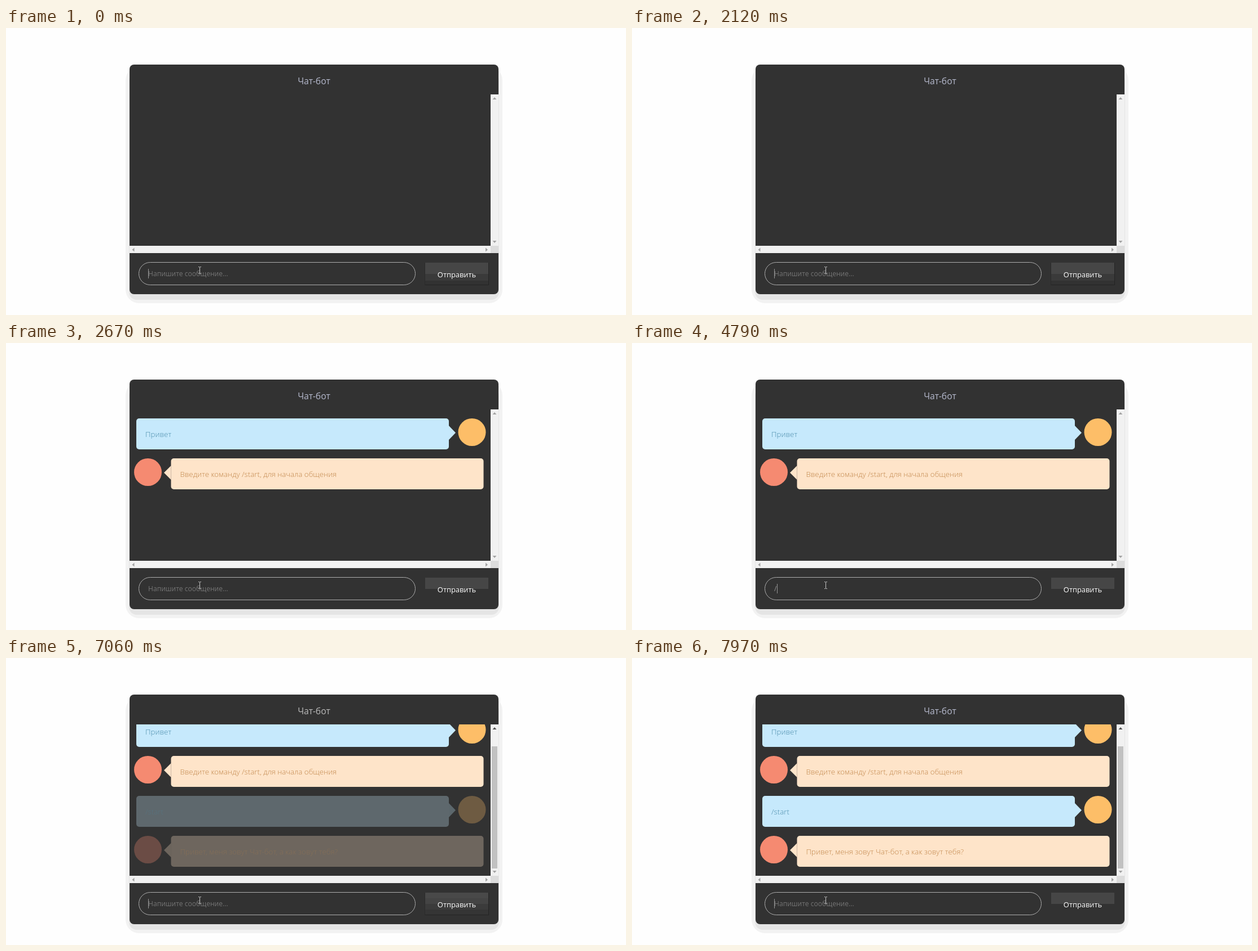
Animation of 1099 by 510 pixels, one loop 8000 ms. Source, as an HTML page with a canvas:

```html
<!DOCTYPE html>
<html lang="ru">
<head>
<meta charset="utf-8">
<title>Чат-бот</title>
<style>
html, body { margin: 0; width: 100%; height: 100%; overflow: hidden; background: #fefefe; }
canvas { display: block; }
</style>
</head>
<body>
<canvas id="stage" width="1099" height="510"></canvas>
<script>
const ctx = document.getElementById('stage').getContext('2d');
const LOOP = 8000;
const FONT = '"Open Sans", "Noto Sans", sans-serif';
const PANEL = '#323232';
const SCROLL_AT = 6910, SCROLL_BY = 31, ROW = 71;

// Moments at which each further character appears
const drafts = [
  { text: 'Привет', keys: [910, 1170, 1300, 1580, 1710, 1840], sent: 2120 },
  { text: '/start', keys: [3750, 5690, 5960, 6240, 6530, 6660], sent: 6910 }
];
const caretOff = [[400, 910], [2670, 3220], [4290, 4790], [5300, 5690], [7460, 7970]];
const fades = [[2250, 2400, 2530, 2670], [7060, 7190, 7320, 7460]];
const levels = [0, 0.29, 0.56, 0.82, 1];

const messages = [
  { text: 'Привет', user: true },
  { text: 'Введите команду /start, для начала общения', user: false },
  { text: '/start', user: true },
  { text: 'Привет, меня зовут Чат-бот, а как зовут тебя?', user: false }
];
const themes = {
  user: { x: 231, fill: '#c6e9fc', ink: '#4a8cab', side: 785, tip: 797, faceX: 826, face: '#fdbe68' },
  bot: { x: 292.5, fill: '#fee4c9', ink: '#c08549', side: 292.5, tip: 280, faceX: 251.5, face: '#f58a71' }
};

const countPassed = (times, t) => times.filter(at => t >= at).length;
const within = (t, [from, to]) => t >= from && t < to;

function rect(x, y, w, h, fill) {
  ctx.fillStyle = fill;
  ctx.fillRect(x, y, w, h);
}

function roundPath(x, y, w, h, r) {
  ctx.beginPath();
  ctx.roundRect(x, y, w, h, r);
}

function roundRect(x, y, w, h, r, fill) {
  roundPath(x, y, w, h, r);
  ctx.fillStyle = fill;
  ctx.fill();
}

function triangle(x1, y1, x2, y2, x3, y3, fill) {
  ctx.beginPath();
  ctx.moveTo(x1, y1);
  ctx.lineTo(x2, y2);
  ctx.lineTo(x3, y3);
  ctx.fillStyle = fill;
  ctx.fill();
}

function label(text, x, y, size, fill, weight = 400, align = 'left') {
  ctx.font = `${weight} ${size}px ${FONT}`;
  ctx.textAlign = align;
  ctx.fillStyle = fill;
  ctx.fillText(text, x, y);
}

function drawPanel(fading) {
  rect(0, 0, 1099, 510, '#fefefe');
  roundRect(212, 69, 668, 420, 24, '#f2f2f2');
  roundRect(218, 80, 656, 403, 14, '#e5e5e5');
  roundRect(219, 65, 654, 408, 8, PANEL);
  label('Чат-бот', 546, 100, 15.7, fading ? '#bababa' : '#b5b9cd', 400, 'center');
}

function drawMessage(message, y) {
  const look = message.user ? themes.user : themes.bot;
  roundRect(look.x, y, 554, 55, 5, look.fill);
  triangle(look.side, y + 13, look.tip, y + 25.5, look.side, y + 38, look.fill);
  ctx.beginPath();
  ctx.arc(look.faceX, y + 24.5, 24.5, 0, Math.PI * 2);
  ctx.fillStyle = look.face;
  ctx.fill();
  label(message.text, look.x + 16, y + 33, 13.3, look.ink, 300);
}

function drawMessages(t) {
  const top = 134 - (t >= SCROLL_AT ? SCROLL_BY : 0);
  ctx.save();
  ctx.beginPath();
  ctx.rect(219, 118, 640, 269);
  ctx.clip();
  messages.forEach((message, i) => {
    ctx.globalAlpha = levels[countPassed(fades[i >> 1], t)];
    drawMessage(message, top + i * ROW);
  });
  ctx.restore();
}

function drawScrollbars(t) {
  const scrolled = t >= SCROLL_AT, dim = '#a3a3a3';
  rect(859, 118, 14, 269, '#f1f1f1');
  rect(219, 387, 640, 13, '#f1f1f1');
  rect(859, 387, 14, 13, '#dcdcdc');
  if (scrolled) rect(861, 157, 10, 217, '#c1c1c1');
  triangle(862.5, 127, 866, 123, 869.5, 127, scrolled ? '#505050' : dim);
  triangle(862.5, 378, 866, 382, 869.5, 378, dim);
  triangle(227.5, 390.5, 223.5, 394, 227.5, 397.5, dim);
  triangle(850, 390.5, 854, 394, 850, 397.5, dim);
}

function drawInput(t) {
  roundPath(235.5, 416.5, 490, 40, 20);
  ctx.strokeStyle = '#adadad';
  ctx.lineWidth = 1;
  ctx.stroke();

  const draft = drafts.find(d => within(t, [d.keys[0], d.sent]));
  const typed = draft ? draft.text.slice(0, countPassed(draft.keys, t)) : '';
  label(typed || 'Напишите сообщение...', 252, 441, 12.1, typed ? '#969696' : '#757575');
  if (!caretOff.some(span => within(t, span))) {
    const x = Math.ceil(252 + ctx.measureText(typed).width);
    rect(x, 428, 1, 17, '#969696');
  }
}

function drawButton(t, fading) {
  if (fading) {
    ['#494949', '#444444', '#3b3b3b', '#353535'].forEach((fill, i) => rect(743, 417 + i * 10, 112, 10, fill));
  } else {
    rect(743, 417, 112, 20, '#464646');
    if (t < fades[0][0]) rect(743, 437, 112, 12, '#3a3a3a');
  }
  if (fading || t < fades[0][0]) {
    rect(742, 456, 114, 1, '#242424');
    rect(855, 417, 1, 40, '#242424');
    rect(742, 417, 1, 40, '#2b2b2b');
  }
  label('Отправить', 799, 443, 12.9, '#ffffff', 400, 'center');
}

function drawPointer() {
  const fill = '#c4c4c4';
  rect(343, 425, 1, 11, fill);
  for (const y of [424, 436]) {
    rect(341, y, 2, 1, fill);
    rect(344, y, 2, 1, fill);
  }
}

function draw(now) {
  const t = now % LOOP;
  const fading = fades.some(steps => within(t, [steps[0], steps[3]]));
  drawPanel(fading);
  drawMessages(t);
  drawScrollbars(t);
  drawInput(t);
  drawButton(t, fading);
  drawPointer();
}

let start;
function tick(now) {
  start ??= now;
  draw(Math.max(0, now - start));
  requestAnimationFrame(tick);
}
draw(0);
requestAnimationFrame(tick);
</script>
</body>
</html>
```
